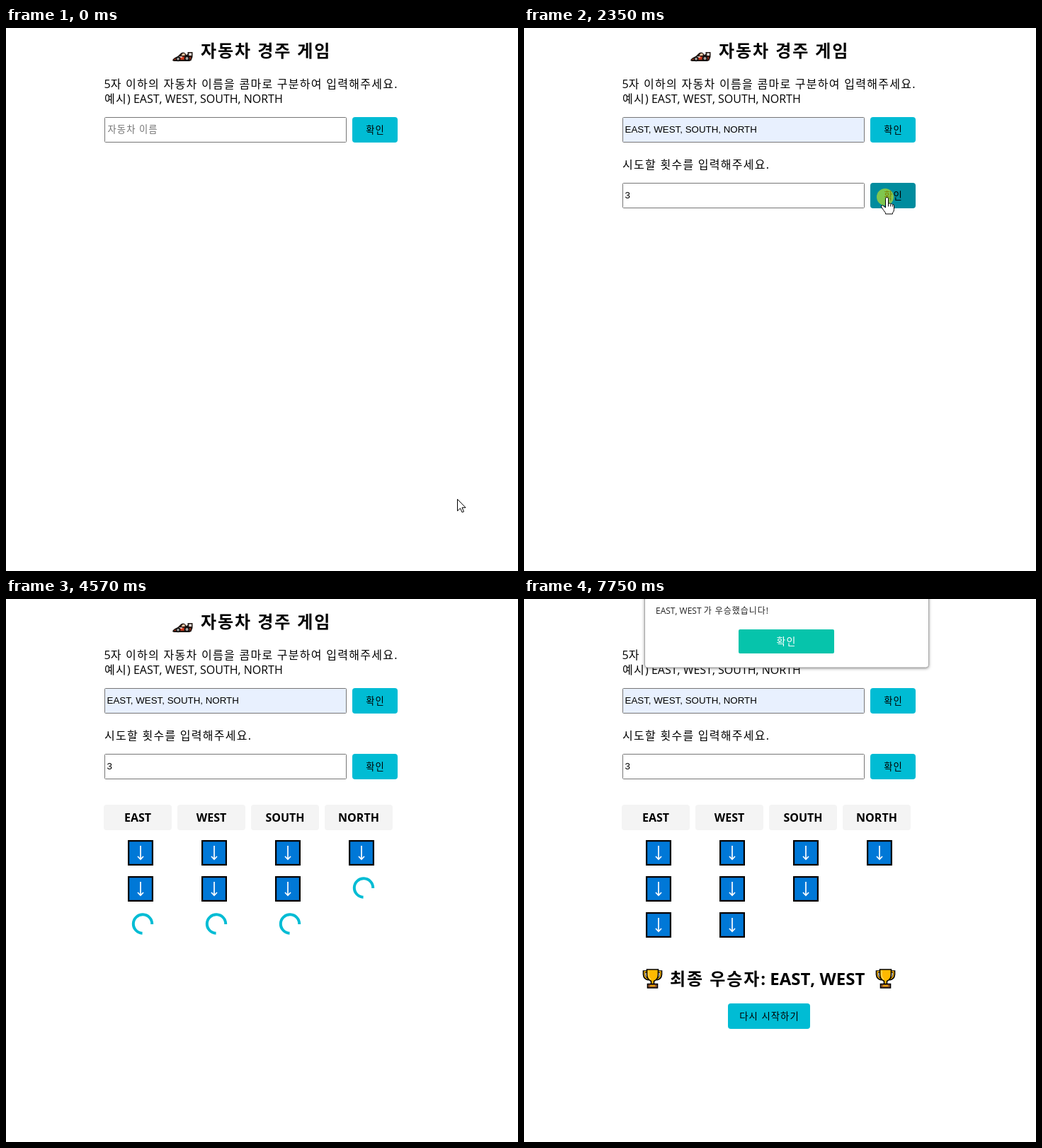
Write an HTML page with a canvas that moves like this. It is 723x768 px and loops after 8 s.

```html
<!DOCTYPE html>
<html lang="ko">
<head>
<meta charset="utf-8">
<title>자동차 경주 게임</title>
<style>
html, body { margin: 0; width: 100%; height: 100%; overflow: hidden; background: #fff; }
canvas { display: block; }
</style>
</head>
<body>
<canvas id="stage" width="723" height="768"></canvas>
<script>
const ctx = document.getElementById('stage').getContext('2d');
const LOOP = 8000, TICK = 106.5;
const UI = '"Open Sans", "Noto Sans CJK KR", sans-serif';
const FIELD = '"Liberation Sans", "Noto Sans CJK KR", sans-serif';
const CYAN = '#00bcd4', HOVER = '#008c9e';
const CARS = [['EAST', 3], ['WEST', 3], ['SOUTH', 2], ['NORTH', 1]];
const NAMES = CARS.map(car => car[0]).join(', ');

// When each stage of the game appears
const FILLED = 750, ASK_COUNT = 1370, TYPED = 1800, RACE = 2450, ALERT = 7525;
const LAPS = [3560, 4560, 5560], DONE = LAPS[2];

// Pointer path: time, x, y
const PATH = [
  [100, 637, 666], [430, 300, 144], [900, 300, 144], [1280, 541, 145], [1450, 541, 145],
  [1640, 300, 238], [1870, 300, 238], [2140, 512, 239], [2400, 512, 239], [2640, 630, 262]
];
const CLICKS = [540, 1330 - TICK, 1660, 2310], CLICK_LENGTH = 100, POINTER_GONE = 2800;

// Hangul runs are set one em apart; other runs keep their natural spacing.
function text(str, x, y, size, { weight = 400, color = '#000', family = UI, center = false } = {}) {
  ctx.font = `${weight} ${size}px ${family}`;
  ctx.fontKerning = family === UI ? 'none' : 'normal';
  const runs = str.match(/[가-힣][가-힣 ]*|[^가-힣]+/g).map(run => {
    const spacing = /[가-힣]/.test(run) ? `${size * 0.08}px` : '0px';
    ctx.letterSpacing = spacing;
    return { run, spacing, width: ctx.measureText(run).width };
  });
  if (center) x -= runs.reduce((sum, r) => sum + r.width, 0) / 2;
  ctx.fillStyle = color;
  for (const { run, spacing, width } of runs) {
    ctx.letterSpacing = spacing;
    ctx.fillText(run, x, y);
    x += width;
  }
}

function box(x, y, w, h, r, fill, stroke) {
  ctx.beginPath();
  ctx.roundRect(x, y, w, h, r);
  ctx.fillStyle = fill;
  ctx.fill();
  if (stroke) {
    ctx.strokeStyle = stroke;
    ctx.lineWidth = 1;
    ctx.stroke();
  }
}

function shape(d, fill, stroke, width = 1) {
  const path = new Path2D(d);
  if (fill) { ctx.fillStyle = fill; ctx.fill(path); }
  if (stroke) { ctx.strokeStyle = stroke; ctx.lineWidth = width; ctx.stroke(path); }
}

function disc(x, y, r, fill) {
  ctx.beginPath();
  ctx.arc(x, y, r, 0, 7);
  ctx.fillStyle = fill;
  ctx.fill();
}

function at(x, y, draw) {
  ctx.save();
  ctx.translate(x, y);
  draw();
  ctx.restore();
}

function field(y, value, placeholder, fill = '#fff') {
  box(139.5, y + 0.5, 341, 35, 1, value ? fill : '#fff', '#767676');
  if (value) text(value, 142.5, y + 22, 13.333, { family: FIELD });
  else text(placeholder, 143.5, y + 21.7, 13.333, { color: '#757575' });
}

function button(x, y, w, label, pointer) {
  const over = pointer && pointer.x > x && pointer.x < x + w && pointer.y > y && pointer.y < y + 36;
  box(x, y, w, 36, 4, over ? HOVER : CYAN);
  text(label, x + w / 2 + 0.5, y + 23.3, 13.333, { center: true });
}

function car() {
  shape('M0 13Q1 9 7 7.5L11 3.5Q14 0 18 2.5L19.5 5L21.5 4V1H28.5V8L26.5 13L24 14H2Z', '#201612');
  shape('M2.5 12Q4 9.5 9 8.5L13 7.5H21L23 8.5L25.5 7.5V11.5Z', '#d83b1c');
  shape('M12.5 6L14.5 3H17.5V6Z', '#f3c8a4');
  shape('M23.3 2.5H27V6H23.3Z', '#e9e2dc');
  shape('M9 8H14', null, '#fff', 1.3);
  for (const [x, y, r] of [[8, 10.7, 3.5], [20.5, 10, 4]]) {
    disc(x, y, r, '#111');
    disc(x, y, r / 2, '#aaa6a3');
  }
}

function trophy() {
  shape('M6 4H1.5V8Q2 14 8 15M21 4H25.5V8Q25 14 19 15', null, '#000', 3.6);
  shape('M6 4H2V8Q2.5 13.5 8 14.5M21 4H25V8Q24.5 13.5 19 14.5', null, '#ffb900', 1.4);
  shape('M5.5 1H21.5V9Q21 15 15.5 17.5V22H11.5V17.5Q6 15 5.5 9Z', '#ffb900', '#000', 1.6);
  shape('M8 2.5V10Q8.5 13 11 15', null, '#ffd75e', 1.5);
  shape('M6.5 21.5H20.5V27H6.5Z', '#8e562e', '#000', 1.6);
  shape('M10 24H17', null, '#ffb900', 1.6);
}

function tile() {
  box(0, 0, 36, 36, 0, '#000');
  box(2.2, 2.2, 31.6, 31.6, 0, '#0078d7');
  shape('M18 8V27M14 23L18 27.3L22 23', null, '#fff', 1.7);
}

function spinner(x, y, turn) {
  ctx.beginPath();
  ctx.arc(x, y, 13.2, turn - Math.PI / 4, turn + Math.PI * 5 / 4);
  ctx.strokeStyle = CYAN;
  ctx.lineWidth = 4;
  ctx.stroke();
}

function pointerAt(time) {
  if (time > POINTER_GONE) return null;
  let i = PATH.findIndex(p => p[0] > time);
  if (i < 0) i = PATH.length;
  const a = PATH[Math.max(0, i - 1)], b = PATH[Math.min(i, PATH.length - 1)];
  const k = a === b ? 0 : (time - a[0]) / (b[0] - a[0]);
  const ease = k * k * (3 - 2 * k);
  return { x: Math.round(a[1] + (b[1] - a[1]) * ease), y: Math.round(a[2] + (b[2] - a[2]) * ease) };
}

function drawPointer({ x, y }, t, time) {
  if (CLICKS.some(c => time >= c && time < c + CLICK_LENGTH)) disc(x - 2, y, 12, 'rgba(255,255,0,.5)');
  const inRow = top => y > top && y < top + 36;
  const row = inRow(126) || (t >= ASK_COUNT && inRow(219));
  at(x + 0.5, y + 0.5, () => {
    if (row && x > 489 && x < 553) {
      shape('M-2 2Q-2 0 0 0Q2 0 2 2V9Q4 7.5 5.3 9.5Q7 8.3 8 10.3Q10 9.5 10 12V17Q10 20 8 22V23.5H-2V22Q-5 18 -8 13.5Q-8.5 11 -6 11.3L-2 14.5Z', '#fff', '#000');
      shape('M2 9V13M5.3 10V13M8 11V13', null, '#000');
    } else if (row && x > 139 && x < 481) {
      shape('M-3 -8H3M0 -8V8M-3 8H3', null, '#000');
    } else {
      shape('M0 0V16.5L4 12.8L6.6 18.5L9 17.5L6.5 11.8H11.5Z', '#fff', '#000');
    }
  });
}

function drawRace(t, tick) {
  const turn = (182 + (tick - 30) * 26.25) * Math.PI / 180;
  const lap = LAPS.filter(end => t >= end).length;
  CARS.forEach(([name, distance], col) => {
    const x = 138 + col * 104;
    box(x, 291, 96, 36, 4, '#f4f4f4');
    text(name, x + 48, 315, 16, { weight: 700, center: true });
    const moved = Math.min(distance, lap);
    for (let row = 0; row < moved; row++) at(x + 34, 341 + row * 51, tile);
    if (t < DONE) spinner(x + 55, 357.5 + moved * 51, turn);
  });
}

function drawAlert(alpha) {
  ctx.save();
  ctx.globalAlpha = alpha;
  ctx.shadowColor = 'rgba(0,0,0,.5)';
  ctx.shadowBlur = 4;
  ctx.shadowOffsetY = 1;
  box(170.5, -10, 401, 107, 4, '#fff');
  ctx.shadowColor = 'transparent';
  box(170.5, -10, 401, 107, 4, '#fff', '#a8a8a8');
  text('EAST, WEST 가 우승했습니다!', 186, 21, 12, { color: '#222' });
  box(303, 43, 135, 34, 2, '#06c4ab');
  text('확인', 370.5, 65, 14, { color: '#fff', center: true });
  ctx.restore();
}

function draw(t) {
  const tick = Math.floor(t / TICK), time = tick * 107.5;
  const pointer = pointerAt(time);
  ctx.fillStyle = '#fff';
  ctx.fillRect(0, 0, 723, 768);

  at(235, 33, car);
  text('자동차 경주 게임', 275, 41.3, 24, { weight: 700 });
  text('5자 이하의 자동차 이름을 콤마로 구분하여 입력해주세요.', 138.5, 85, 16);
  text('예시) ' + NAMES, 139, 106, 16);
  field(126, t >= FILLED ? NAMES : '', '자동차 이름', '#e8f0fe');
  button(489, 126, 64, '확인', pointer);

  if (t >= ASK_COUNT) {
    text('시도할 횟수를 입력해주세요.', 139, 199, 16);
    field(219, t >= TYPED ? '3' : '', '시도 횟수');
    button(489, 219, 64, '확인', pointer);
  }
  if (t >= RACE) drawRace(t, tick);
  if (t >= DONE) {
    at(168, 523, trophy);
    text('최종 우승자: EAST, WEST', 206, 546, 24, { weight: 700 });
    at(497, 523, trophy);
    button(288, 572, 116, '다시 시작하기');
  }
  if (pointer) drawPointer(pointer, t, time);
  if (t >= ALERT) drawAlert([0.4, 0.8, 1][Math.min(2, Math.floor((t - ALERT) / 110))]);
}

const start = performance.now();
function frame() {
  draw((performance.now() - start) % LOOP);
  requestAnimationFrame(frame);
}
frame();
</script>
</body>
</html>
```
